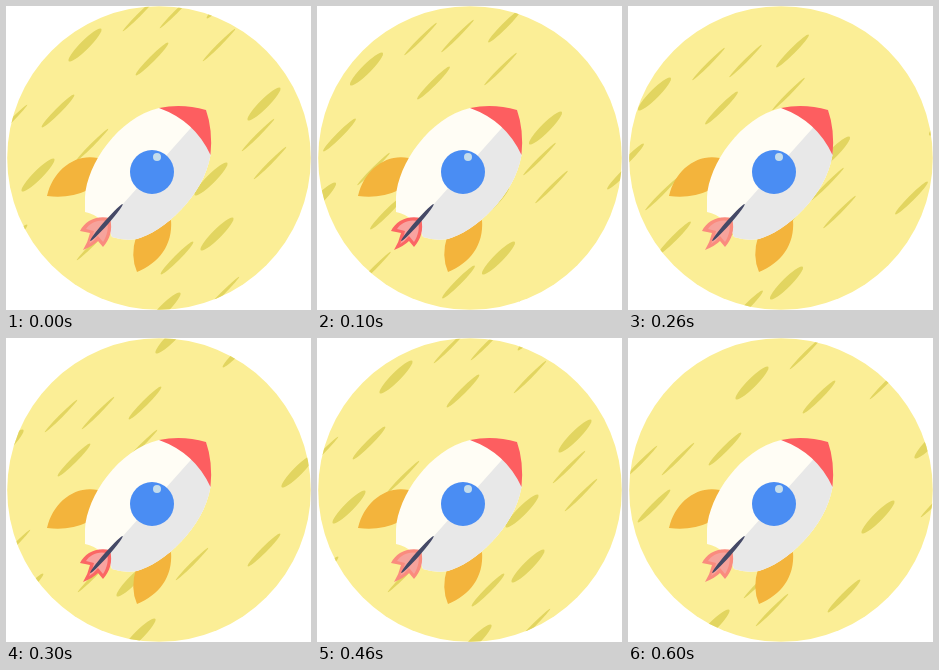
These frames come from a looping animation (305x304 px, 0.7 s). An HTML page with a canvas:

```html
<!DOCTYPE html>
<html lang="en">
<head>
<meta charset="utf-8">
<title>Rocket</title>
<style>
  html, body { margin: 0; width: 100%; height: 100%; overflow: hidden; background: #fff; }
  canvas { display: block; }
</style>
</head>
<body>
<canvas id="stage" width="305" height="304"></canvas>
<script>
const ctx = document.getElementById('stage').getContext('2d');
const LOOP = 700, STEP = 100, TILT = -Math.PI / 4;

// One motif of streaks, keyed by width, repeated along two lattice vectors
const motif = {
  9: [[79, 39], [258, 98], [205, 173]],
  5.6: [[146, 53], [52, 105], [171, 252]],
  3.2: [[133, 9], [5, 115], [213, 39], [264, 157], [87, 238]]
};
const home = [0, 0], down = [-47, 130], left = [-165, 109], right = [165, -109];
const cruise = [home, down, right], settle = [home, left];
const drift = [home, [-29.5, 24], [-52.5, 49], [-78, 69]], rest = [45, 6];

const disc = new Path2D();
disc.arc(153, 152, 151.8, 0, 7);

const fins = 'M92 152C69 147 47 164 41 190Q63 193 82 184Z M165 214C167 239 153 257 131 266Q124 250 130 231Z';
const body = 'M153 102C112 112 81 158 79 191L79 206Q98 210 106 231Q118 235 131 233C157 226 198 190 204.5 149L200 104Z';
const shade = 'M200 105L100 217Q104 223 106 231Q118 235 131 233C157 226 198 190 204.5 149Z';
const nose = 'M153 102Q176 97 200 104Q207 124 204.5 149Q189 115 153 102Z';
const flame = 'M104 212C90 209 79 215 74 225L84 227Q82 236 77 244Q87 240 92 235L97 241C104 233 107 224 104 212Z';
const glow = 'M101 215C91 213 84 217 80 223L88 225Q87 232 83 238Q88 235 92 230L97 236C101 230 103 222 101 215Z';

function fill(path, color) {
  ctx.fillStyle = color;
  ctx.fill(typeof path === 'string' ? new Path2D(path) : path);
}

function ellipse(x, y, rx, ry, color, angle = 0) {
  const p = new Path2D();
  p.ellipse(x, y, rx, ry, angle, 0, 7);
  fill(p, color);
}

function drawSky(step) {
  const moving = step < 5;
  const [dx, dy] = moving ? drift[step % drift.length] : rest;
  fill(disc, '#fbee96');
  ctx.save();
  ctx.clip(disc);
  ctx.translate(dx, dy);
  for (const [cx, cy] of moving ? cruise : settle) {
    for (const width in motif) {
      for (const [x, y] of motif[width]) {
        ellipse(cx + x, cy + y, 23, width / 2, '#e2d560', TILT);
      }
    }
  }
  ctx.restore();
}

function drawRocket(step) {
  const hot = step % 2 === 1;
  fill(fins, '#f3b43c');
  fill(body, '#fffdf5');
  fill(shade, '#e8e8e8');
  fill(nose, '#fd5e60');
  ellipse(146, 166, 22, 22, '#4a8df3');
  ellipse(151, 151, 4, 4, '#c3dcec');
  fill(flame, hot ? '#fb6664' : '#fa8b7e');
  fill(glow, hot ? '#f9a3a0' : '#f6a39c');
  ellipse(100.5, 216.5, 24.5, 2.1, '#454966', TILT * 1.08);
}

function draw(time) {
  const step = Math.floor(time % LOOP / STEP);
  ctx.clearRect(0, 0, 305, 304);
  drawSky(step);
  drawRocket(step);
}

const start = performance.now();
function tick() {
  draw(performance.now() - start);
  requestAnimationFrame(tick);
}
tick();
</script>
</body>
</html>
```
